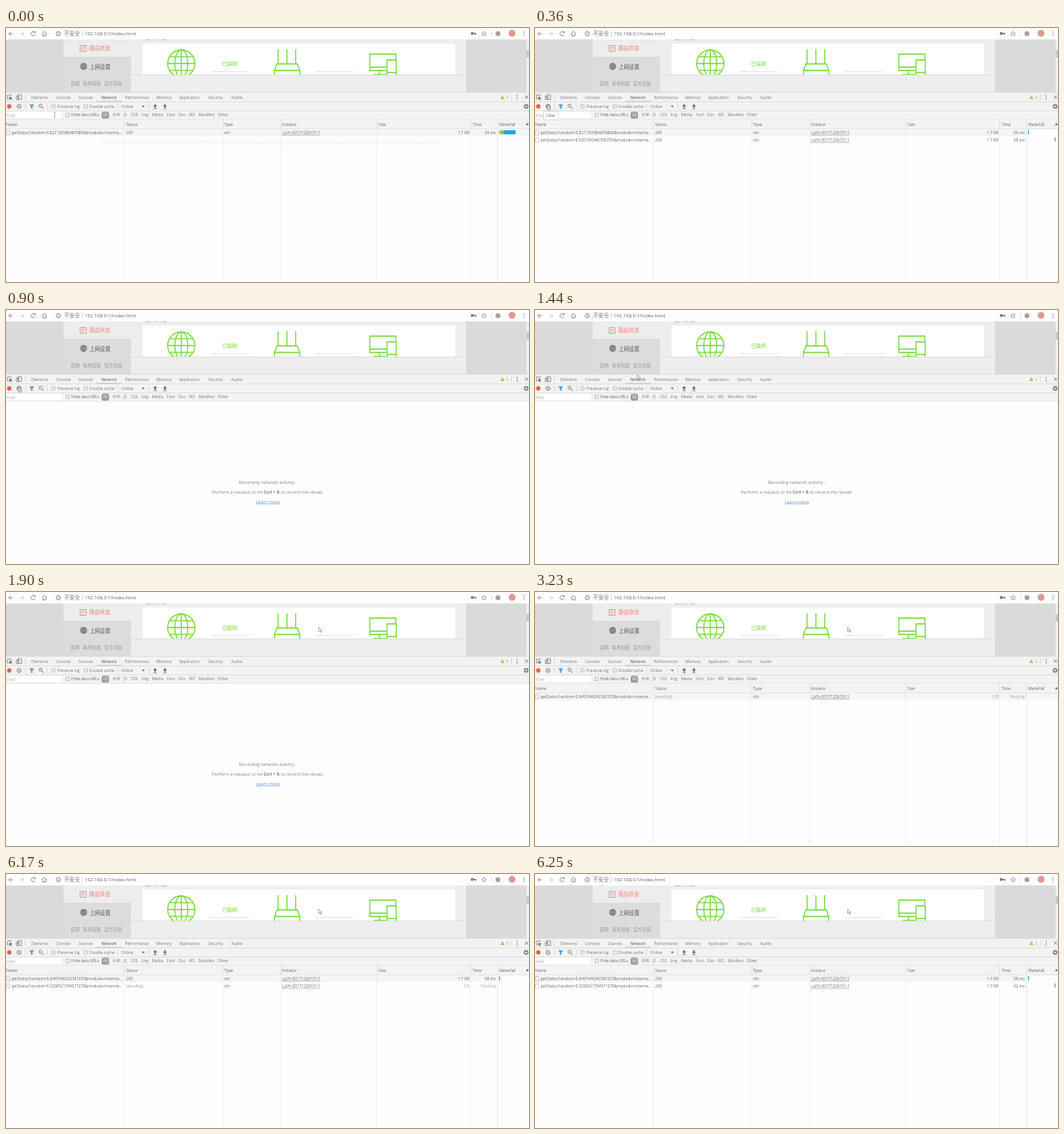
Recreate the animation shown at these times as an HTML page with a canvas. Size 640 by 311 pixels, loop 8000 ms.

```html
<!DOCTYPE html>
<html lang="zh">
<head>
<meta charset="utf-8">
<style>
  html, body { margin: 0; width: 100%; height: 100%; overflow: hidden; background: #fff; }
  canvas { display: block; width: 100vw; height: 100vh; }
</style>
</head>
<body>
<canvas id="stage"></canvas>
<script>
const W = 640, H = 311, LOOP = 8000;
const FONT = '"Open Sans", "Noto Sans CJK SC", "Noto Sans CJK", sans-serif';
const GREEN = '#76d836', GREY = '#7c7c7c', DARK = '#686868', LINE = '#d6d6d6';
const canvas = document.getElementById('stage');
const ctx = canvas.getContext('2d');
const ratio = window.devicePixelRatio || 1;
canvas.width = W * ratio;
canvas.height = H * ratio;
ctx.scale(ratio, ratio);

function rect(x, y, w, h, color) {
  ctx.fillStyle = color;
  ctx.fillRect(x, y, w, h);
}

function text(str, x, y, { size = 4.8, color = GREY, align = 'left', weight = 400 } = {}) {
  ctx.font = `${weight} ${size}px ${FONT}`;
  ctx.textAlign = align;
  ctx.textBaseline = 'alphabetic';
  ctx.fillStyle = color;
  ctx.fillText(str, x, y + size * 0.36);
  return ctx.measureText(str).width;
}

function stroke(d, color = GREY, width = 0.8) {
  ctx.strokeStyle = color;
  ctx.lineWidth = width;
  ctx.stroke(new Path2D(d));
}

function fill(d, color = GREY) {
  ctx.fillStyle = color;
  ctx.fill(new Path2D(d));
}

function circle(x, y, r, color) {
  ctx.beginPath();
  ctx.arc(x, y, r, 0, Math.PI * 2);
  ctx.fillStyle = color;
  ctx.fill();
}

function ring(x, y, r, color = GREY, width = 0.8) {
  ctx.beginPath();
  ctx.arc(x, y, r, 0, Math.PI * 2);
  ctx.strokeStyle = color;
  ctx.lineWidth = width;
  ctx.stroke();
}

function globe(x, y, r, color, width) {
  ring(x, y, r, color, width);
  ctx.beginPath();
  ctx.ellipse(x, y, r * 0.48, r, 0, 0, Math.PI * 2);
  ctx.stroke();
  const half = r * 0.86, off = r * 0.5;
  stroke(`M${x} ${y - r}V${y + r}M${x - r} ${y}H${x + r}` +
    `M${x - half} ${y - off}H${x + half}M${x - half} ${y + off}H${x + half}`, color, width);
}

function dots(x, y) {
  for (const dy of [-2.3, 0, 2.3]) circle(x, y + dy, 0.65, GREY);
}

function addressBar() {
  rect(0, 0, W, 14, '#fefefe');
  stroke('M8.5 7H3.5M6 4.5L3.5 7L6 9.5');
  stroke('M17 7H22M19.5 4.5L22 7L19.5 9.5', '#c4c4c4');
  stroke('M35.3 5.2A2.6 2.6 0 1 0 35.7 8M35.8 3.8V5.8H33.8');
  stroke('M44 7L47 4.2L50 7M45 6.5V9.7H49V6.5');
  ring(64, 7, 2.6);
  stroke('M64 6.5V8.6M64 5.2V5.8');
  text('不安全', 71, 6.7, { size: 6.5 });
  rect(93, 3.5, 0.5, 7, '#bbb');
  text('192.168.0.1/index.html', 96.3, 6.7, { size: 5.9, color: DARK });
  ring(570.5, 6.8, 1.2, '#555', 1.1);
  stroke('M572 6.8H575.5M574.4 7V8.2', '#555', 1.1);
  stroke('M585 4L585.9 6L588 6.2L586.4 7.5L586.9 9.6L585 8.5L583.1 9.6L583.6 7.5L582 6.2L584.1 6Z', GREY, 0.6);
  rect(594, 3, 0.6, 8, '#ddd');
  circle(602, 7, 3, '#a8a09c');
  circle(619.3, 6.5, 4.2, '#e0998d');
  dots(634, 7);
}

function webPage() {
  rect(0, 14, W, 65, '#dadada');
  rect(70.5, 14, 82.5, 21.5, '#ededed');
  rect(70.5, 35.5, 82.5, 43, '#dcdcdc');
  rect(153, 14, 410, 64.5, '#eeeeee');
  rect(167, 19, 382.5, 38, '#fff');
  rect(153, 57, 410, 0.7, '#d8d8d8');
  rect(637, 14, 3, 65, '#f1f1f1');
  rect(637.2, 27, 2.6, 9, '#c4c4c4');

  stroke('M90.8 21.5H98V28.5H90.8ZM92.5 24H96.4M92.5 26H95', '#ea8275', 0.8);
  text('路由状态', 102, 25, { size: 6.4, color: '#ea8275' });
  globe(95, 47, 3.8, DARK, 0.8);
  text('上网设置', 102.5, 47.3, { size: 6.3, color: '#555' });
  text('官网', 79, 68, { size: 5.5, color: '#999' });
  text('青禾短报', 94, 68, { size: 5.5, color: '#999' });
  text('官方讯简', 120, 68, { size: 5.5, color: '#999' });

  ctx.save();
  ctx.beginPath();
  ctx.rect(153, 14, 410, 43.2);
  ctx.clip();
  text('上网状态', 171, 11.8, { size: 6.4, color: '#888' });
  globe(214.5, 43.5, 16.7, GREEN, 1.3);
  stroke('M333 26V44M343.8 26V44M354.5 26V44', GREEN, 1.3);
  stroke('M331.5 44H356.5L359.5 52V60H328.5V52ZM328.5 52H359.5', GREEN, 1.3);
  stroke('M465.5 52H445.2V32H477V38.5M445.2 48H465.5M457 52V57M450 57H465', GREEN, 1.3);
  stroke('M466.3 39H477.5V60H466.3ZM466.3 54.5H477.5', GREEN, 1.3);
  ctx.restore();
  text('已联网', 264.5, 44, { size: 6.2, color: GREEN });
  rect(251, 53, 46, 0.7, '#dcdcdc');
  rect(379, 53, 46, 0.7, '#dcdcdc');
}

function checkbox(x, y) {
  stroke(`M${x} ${y - 2}h4v4h-4Z`, '#a5a5a5', 0.6);
}

function devTools(clearHovered) {
  rect(0, 79, W, 33, '#f3f3f3');
  for (const y of [78.6, 90, 101, 111.6]) rect(0, y, W, 0.6, LINE);
  rect(110.5, 89.5, 31, 0.9, '#a9bcd6');

  stroke('M6.5 83V82H1.8V87H3.5');
  fill('M4 84L8 85.5L6.2 86.2L7.5 88L6.7 88.5L5.4 86.8L4.2 88Z', DARK);
  stroke('M14.5 86.5V81.8H19V87.5H16.2M12.7 83.3H15.7V87.7H12.7Z');
  rect(23.5, 81, 0.6, 7, '#ccc');
  const tabs = { Elements: 31, Console: 61.3, Sources: 89, Network: 116.5, Performance: 145.5,
    Memory: 184, Application: 212, Security: 247.5, Audits: 275.5 };
  for (const [name, x] of Object.entries(tabs)) {
    text(name, x, 84.8, { color: name === 'Network' ? '#555' : GREY });
  }
  fill('M607.5 82L610 87H605Z', '#e3ad5c');
  text('1', 612, 84.8);
  rect(618, 81, 0.6, 7, '#ccc');
  dots(625.5, 84.7);
  stroke('M635 82.6L639 86.6M639 82.6L635 86.6', DARK);

  circle(4, 96, 2.7, '#e0653f');
  const clearColor = clearHovered ? '#444' : GREY;
  ring(16, 96, 2.4, clearColor, 0.9);
  stroke('M14.3 94.3L17.7 97.7', clearColor, 0.9);
  rect(23.5, 92.5, 0.6, 7, '#ccc');
  fill('M28.5 93.5H34.5L32.4 96.2V99H30.6V96.2Z', '#4f9bd4');
  ring(42.3, 95.2, 1.9);
  stroke('M43.7 96.7L46 99', GREY, 1);
  rect(50.5, 92.5, 0.6, 7, '#ccc');
  checkbox(56, 96);
  text('Preserve log', 63, 96);
  checkbox(95.5, 96);
  text('Disable cache', 102, 96);
  rect(136, 92.5, 0.6, 7, '#ccc');
  text('Online', 141, 96);
  fill('M166.3 95H169.7L168 97.5Z', DARK);
  rect(174, 92.5, 0.6, 7, '#ccc');
  fill('M182.5 93L184.8 96H183.2V98H181.8V96H180.2ZM180.5 98.5H184.5V99.2H180.5Z', DARK);
  fill('M194.5 98L196.8 95H195.2V93H193.8V95H192.2ZM192.5 98.5H196.5V99.2H192.5Z', DARK);
  ring(636.5, 96, 1.9, DARK, 1.1);
  for (let i = 0; i < 8; i++) {
    const a = i * Math.PI / 4;
    circle(636.5 + 2.7 * Math.cos(a), 96 + 2.7 * Math.sin(a), 0.55, DARK);
  }

  rect(0, 102.5, 68, 8, '#fff');
  text('Filter', 0.5, 106.8, { color: '#aaa' });
  checkbox(73.5, 106.5);
  text('Hide data URLs', 80, 106.6, { color: DARK });
  ctx.beginPath();
  ctx.roundRect(117, 102.4, 9.2, 8.6, 2.5);
  ctx.fillStyle = '#9e9e9e';
  ctx.fill();
  text('All', 121.6, 106.7, { color: '#eee', align: 'center' });
  const kinds = { XHR: 130.5, JS: 144, CSS: 153, Img: 166, Media: 178.5, Font: 197, Doc: 211,
    WS: 224, Manifest: 235.7, Other: 259 };
  for (const [name, x] of Object.entries(kinds)) text(name, x, 106.7);
}

function requestRow(index, { random, time }) {
  const y = 128.3 + index * 9;
  const pending = time === 'Pending';
  const color = pending ? '#a5a5a5' : DARK;
  if (index === 0) rect(0, 123.8, 601, 8.8, '#f5f5f5');
  stroke(`M0.6 ${y - 2.7}h3.9v5.4h-3.9Z`, '#b5b5b5', 0.6);
  text(`getStatus?random=${random}&modules=interne…`, 7, y, { size: 4.73, color: DARK });
  text(pending ? '(pending)' : '200', 147, y, { color });
  text('xhr', 267, y, { color: DARK });
  const width = text('j.js?t=20171226151:1', 338, y, { color: DARK });
  rect(338, y + 2.5, width, 0.5, '#888');
  text(pending ? '0 B' : '1.7 KB', 567, y, { color, align: 'right' });
  text(time, 599.3, y, { color, align: 'right' });
}

function requestTable(rows, startColor, markColor) {
  rect(0, 112, W, 11.5, '#f3f3f3');
  rect(0, 123.2, W, 0.6, LINE);
  const columns = { Name: 0.3, Status: 147, Type: 267, Initiator: 338, Size: 456, Time: 571, Waterfall: 603.5 };
  for (const [name, x] of Object.entries(columns)) text(name, x, 117.8, { color: DARK });
  fill('M636.3 119L638 116L639.7 119Z', DARK);
  rows.forEach((row, i) => requestRow(i, row));
  for (const x of [144.3, 265, 336, 453.5, 568, 601]) {
    rect(x, 112, 0.6, 11.5, LINE);
    rect(x, 123.5, 0.6, H - 123.5, x === 601 ? '#dcdcdc' : '#e9e9e9');
  }
  if (rows.length === 1) {
    rect(602, 123.8, 38, 8.8, '#f5f5f5');
    if (rows[0].time === 'Pending') return;
    rect(603.2, 126.6, 2.5, 2.2, startColor);
    rect(604.8, 125.2, 5, 5, startColor);
    rect(609.5, 125.2, 14, 5, '#1ca4ee');
  } else {
    rect(603.2, 125, 1.4, 5.4, '#3fb5ef');
    if (rows[1].time !== 'Pending') rect(635.8, 134, 1.2, 5.2, markColor);
  }
}

function emptyState() {
  const color = '#858585', size = 5.5, link = '#6f94c4';
  text('Recording network activity...', 320.5, 211, { size, color, align: 'center' });
  const parts = [['Perform a request or hit ', 400], ['Ctrl + R', 700], [' to record the reload.', 400]];
  let x = 252;
  for (const [str, weight] of parts) x += text(str, x, 223, { size, color, weight });
  const width = text('Learn more', 320.5, 234.8, { size, color: link, align: 'center' });
  rect(320.5 - width / 2, 237.4, width, 0.5, link);
}

// The request's address, almost faded away.
function fadingTip() {
  rect(117, 136, 423, 9, '#fcfcfc');
  text('http://192.168.0.1/goform/getStatus?random=0.8211505864876808&modules=internetStatus%2C' +
    'deviceStatistics%2CsystemInfo%2CwanAdvCfg%2CwifiRelay%2CwifiBasicCfg%2CsysTime',
    119, 140.5, { color: '#f0f0f0' });
}

const progress = (t, from, to) => {
  const p = Math.min(1, Math.max(0, (t - from) / (to - from)));
  return p * p * (3 - 2 * p);
};
const mix = (a, b, p) => a + (b - a) * p;

function pointer(t) {
  if (t < 70) {
    stroke('M58.3 103.6H60.7M59.5 103.6V109M58.3 109H60.7', '#888', 0.6);
    return;
  }
  const toClear = progress(t, 40, 300), toPage = progress(t, 1180, 1900);
  const x = mix(mix(59, 15.5, toClear), 382.7, toPage);
  const y = mix(mix(104, 94.8, toClear), 43, toPage);
  const arrow = `M${x} ${y}v5.4l1.3 -1.1l0.9 2l1 -0.5l-0.9 -1.8h1.7Z`;
  fill(arrow, '#fff');
  stroke(arrow, '#777', 0.6);
}

function requests(t) {
  const before = { random: '0.8211505864876808', time: '59 ms' };
  const after = { random: '0.9497649242381033', time: '58 ms' };
  if (t < 140) return [before];
  if (t < 750) return [before, { random: '0.5201992467050709', time: t < 215 ? 'Pending' : '68 ms' }];
  if (t < 3230) return [];
  if (t < 3310) return [{ ...after, time: 'Pending' }];
  if (t < 6170) return [after];
  return [after, { random: '0.3290521794571278', time: t < 6250 ? 'Pending' : '62 ms' }];
}

function draw(t) {
  const early = t < 750;
  rect(0, 0, W, H, '#fefefe');
  addressBar();
  webPage();
  devTools(t > 215 && t < 1280);
  const rows = requests(t);
  if (t < 70) fadingTip();
  if (rows.length) requestTable(rows, early ? '#8cc152' : '#4caf50', early ? '#8a9299' : '#35bdf0');
  else emptyState();
  if (t >= 290 && t < 820) {
    rect(10.5, 102, 18, 10.5, '#fff');
    stroke('M10.5 102H28.5V112.5H10.5Z', '#c4c4c4', 0.6);
    text('Clear', 19.5, 107.3, { color: DARK, align: 'center' });
  }
  pointer(t);
}

function tick(now) {
  draw(now % LOOP);
  requestAnimationFrame(tick);
}
requestAnimationFrame(tick);
</script>
</body>
</html>
```
